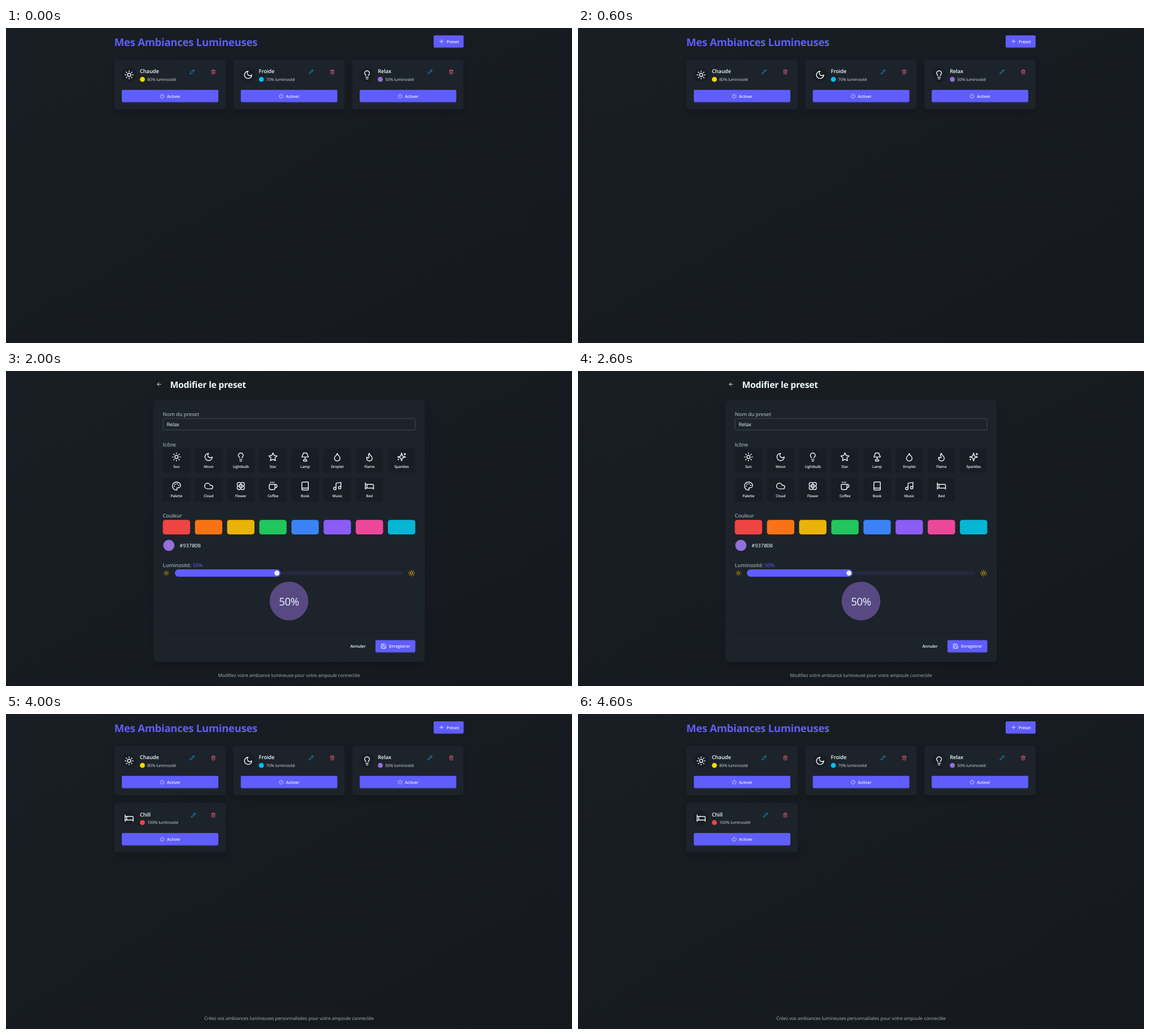
An HTML page for the animation above (5000 ms loop, 1002 by 559 pixels).

```html
<!DOCTYPE html>
<html lang="fr">
<head>
<meta charset="utf-8">
<title>Ambiances</title>
<style>
  html, body { margin: 0; width: 100%; height: 100%; overflow: hidden; }
  body { background: linear-gradient(to bottom right, #191e24, #15191e); }
  svg { display: block; width: 1002px; height: 559px; }
  text {
    font-family: "Open Sans", "Noto Sans", sans-serif;
    letter-spacing: -.015em;
    text-rendering: geometricPrecision;
    white-space: pre;
  }
  .mono { font-family: "Noto Sans Mono", "DejaVu Sans Mono", monospace; letter-spacing: 0; }
  .icon { fill: none; stroke-width: 2; stroke-linecap: round; stroke-linejoin: round; }
  .card { filter: drop-shadow(0 7px 5px rgb(0 0 0 / .14)); }
  .toast { filter: drop-shadow(0 2px 4px rgb(0 0 0 / .1)); }
</style>
</head>
<body>
<svg id="stage" viewBox="0 0 1002 559"></svg>
<script>
const INK = '#ecf9ff', PRIMARY = '#605dff', ON_PRIMARY = '#edf1fe';
const CARD = '#1d232a', TILE = '#191e24', MUTED = '#9aa3aa', AMBER = '#efb100';
const SWATCHES = ['#ef4444', '#f97316', '#eab308', '#22c55e', '#3b82f6', '#8b5cf6', '#ec4899', '#06b6d4'];

const ring = (x, y, r) => `M${x - r} ${y}a${r} ${r} 0 1 0 ${2 * r} 0a${r} ${r} 0 1 0 ${-2 * r} 0`;

// Outlines on a 24-unit grid
const ICONS = {
  Sun: ring(12, 12, 4) + 'M12 2v2M12 20v2M4.93 4.93l1.41 1.41M17.66 17.66l1.41 1.41M2 12h2M20 12h2M6.34 17.66l-1.41 1.41M19.07 4.93l-1.41 1.41',
  Moon: 'M12 3a6 6 0 0 0 9 9 9 9 0 1 1-9-9Z',
  Lightbulb: 'M15 14c.2-1 .7-1.7 1.5-2.5 1-.9 1.5-2.2 1.5-3.5A6 6 0 0 0 6 8c0 1 .2 2.2 1.5 3.5.7.7 1.3 1.5 1.5 2.5M9 18h6M10 22h4',
  Star: 'M12 2 15.1 8.3 22 9.3 17 14.1 18.2 21 12 17.8 5.8 21 7 14.1 2 9.3 8.9 8.3Z',
  Lamp: 'M8 2h8l4 10H4ZM12 12v6M8 22v-2c0-1.1.9-2 2-2h4a2 2 0 0 1 2 2v2Z',
  Droplet: 'M12 22a7 7 0 0 0 7-7c0-2-1-3.9-3-5.5s-3.5-4-4-6.5c-.5 2.5-2 4.9-4 6.5S5 13 5 15a7 7 0 0 0 7 7Z',
  Flame: 'M8.5 14.5A2.5 2.5 0 0 0 11 12c0-1.4-.5-2-1-3-1.1-2.1-.2-4 2-6 .5 2.5 2 4.9 4 6.5s3 3.5 3 5.5a7 7 0 1 1-14 0c0-1.2.4-2.3 1-3a2.5 2.5 0 0 0 2.5 2.5Z',
  Sparkles: 'M12 2.2 13.9 8.5a2 2 0 0 0 1.6 1.6L21.8 12 15.5 13.9a2 2 0 0 0-1.6 1.6L12 21.8 10.1 15.5a2 2 0 0 0-1.6-1.6L2.2 12 8.5 10.1a2 2 0 0 0 1.6-1.6ZM20 3v4M22 5h-4M4 17v2M5 18H3',
  Palette: ring(13.5, 6.5, .5) + ring(17.5, 10.5, .5) + ring(8.5, 7.5, .5) + ring(6.5, 12.5, .5) +
    'M12 2a10 10 0 0 0 0 20c.9 0 1.6-.7 1.6-1.7 0-.4-.2-.8-.4-1.1-.3-.3-.4-.7-.4-1.1a1.6 1.6 0 0 1 1.6-1.7h2c3.1 0 5.6-2.5 5.6-5.6C22 6 17.5 2 12 2Z',
  Cloud: 'M17.5 19H9a7 7 0 1 1 6.71-9h1.79a4.5 4.5 0 1 1 0 9Z',
  Flower: ring(12, 12, 3) + 'M12 16.5A4.5 4.5 0 1 1 7.5 12 4.5 4.5 0 1 1 12 7.5a4.5 4.5 0 1 1 4.5 4.5 4.5 4.5 0 1 1-4.5 4.5M12 7.5V9M7.5 12H9M16.5 12H15M12 16.5V15M8 8l1.9 1.9M14.1 9.9 16 8M8 16l1.9-1.9M14.1 14.1 16 16',
  Coffee: 'M6 2v2M10 2v2M14 2v2M16 8a1 1 0 0 1 1 1v8a4 4 0 0 1-4 4H7a4 4 0 0 1-4-4V9a1 1 0 0 1 1-1h14a4 4 0 1 1 0 8h-1',
  Book: 'M4 19.5v-15A2.5 2.5 0 0 1 6.5 2H19a1 1 0 0 1 1 1v18a1 1 0 0 1-1 1H6.5a1 1 0 0 1 0-5H20',
  Music: 'M9 18V5l12-2v13' + ring(6, 18, 3) + ring(18, 16, 3),
  Bed: 'M2 4v16M2 8h18a2 2 0 0 1 2 2v10M2 17h20M6 8v9'
};
const GLYPHS = {
  pencil: 'M21.2 6.8a1 1 0 0 0-4-4L3.8 16.2a2 2 0 0 0-.5.8L2 21.4a.5.5 0 0 0 .6.6L7 20.7a2 2 0 0 0 .8-.5ZM15 5l4 4',
  trash: 'M3 6h18M19 6v14c0 1-1 2-2 2H7c-1 0-2-1-2-2V6M8 6V4c0-1 1-2 2-2h4c1 0 2 1 2 2v2M10 11v6M14 11v6',
  power: 'M12 2v10M18.4 6.6a9 9 0 1 1-12.8 0',
  plus: 'M5 12h14M12 5v14',
  check: 'M20 6 9 17l-5-5',
  back: 'M12 19l-7-7 7-7M19 12H5',
  save: 'M15.2 3a2 2 0 0 1 1.4.6l3.8 3.8a2 2 0 0 1 .6 1.4V19a2 2 0 0 1-2 2H5a2 2 0 0 1-2-2V5a2 2 0 0 1 2-2ZM17 21v-7a1 1 0 0 0-1-1H8a1 1 0 0 0-1 1v7M7 3v4a1 1 0 0 0 1 1h7'
};

const rect = (x, y, w, h, r, fill, extra = '') =>
  `<rect x="${x}" y="${y}" width="${w}" height="${h}" rx="${r}" fill="${fill}" ${extra}/>`;
const disc = (x, y, r, fill, extra = '') => `<circle cx="${x}" cy="${y}" r="${r}" fill="${fill}" ${extra}/>`;
const text = (x, y, size, content, fill = INK, weight = 400, extra = '') =>
  `<text x="${x}" y="${y}" font-size="${size}" fill="${fill}" font-weight="${weight}" ${extra}>${content}</text>`;
const centered = (x, y, size, content, fill, weight) =>
  text(x, y, size, content, fill, weight, 'text-anchor="middle"');
const icon = (path, x, y, size, color = INK) =>
  `<path class="icon" d="${path}" stroke="${color}" transform="translate(${x} ${y}) scale(${size / 24}) translate(-12 -12)"/>`;

const button = (x, y, w, glyph, glyphX, size, labelX, label) =>
  rect(x + .5, y + 2, w - 1, 20.6, 2, PRIMARY, 'opacity=".4"') +
  rect(x, y, w, 21.4, 2.1, '#5956ee') +
  rect(x + .4, y + .4, w - .8, 20.6, 1.8, PRIMARY) +
  icon(GLYPHS[glyph], glyphX, y + 10.7, size, ON_PRIMARY) +
  text(labelX, y + 13.7, 7.3, label, ON_PRIMARY, 600);

const footer = content => centered(501, 542.6, 8.3, content, '#a8b1b7');

function presetCard(x, y, { name, iconName, color, level, pencilX = 137.5 }) {
  return rect(x, y, 196.7, 87.5, 4.3, CARD, 'class="card"') +
    disc(x + 26, y + 26.7, 12.9, TILE) +
    icon(ICONS[iconName], x + 26, y + 26.7, 17.2) +
    text(x + 45, y + 23.7, 9.4, name, INK, 600) +
    disc(x + 49.5, y + 34.7, 4.4, color) +
    text(x + 58, y + 37.4, 7.35, `${level}% luminosité`, '#cbd6dc') +
    icon(GLYPHS.pencil, x + pencilX, y + 21.3, 9.2, '#00bafe') +
    icon(GLYPHS.trash, x + 175, y + 21.3, 9.2, '#ff627d') +
    button(x + 13, y + 53.3, 171, 'power', x + 84.5, 9.2, x + 93, 'Activer');
}

const presets = [
  { name: 'Chaude', iconName: 'Sun', color: '#ffd700', level: 80 },
  { name: 'Froide', iconName: 'Moon', color: '#00bfff', level: 70 },
  { name: 'Relax', iconName: 'Lightbulb', color: '#9370db', level: 50 },
  { name: 'Chill', iconName: 'Bed', color: '#ef4444', level: 100, pencilX: 140 }
];

const home = count =>
  text(191.8, 31.5, 18.55, 'Mes Ambiances Lumineuses', PRIMARY, 700) +
  button(757, 13, 53.2, 'plus', 771, 10.7, 780, 'Preset') +
  presets.slice(0, count).map((preset, i) =>
    presetCard(192 + i % 3 * 210.6, 56.5 + Math.floor(i / 3) * 101.5, preset)).join('');

const toast = message =>
  rect(405.5, 13, 191, 28.7, 4.3, '#ecfdf3', 'stroke="#bffcd9" stroke-width=".5" class="toast"') +
  disc(417.8, 27.4, 4.3, '#008a2e') +
  `<path class="icon" d="M415.9 27.6l1.3 1.3 2.5-2.8" stroke="#ecfdf3" style="stroke-width:.9"/>` +
  text(427, 30, 6.9, message, '#008a2e', 500);

function editor({ title, name, selectedIcon, color, code, level, thumbX, glow, cancelX, action, note }) {
  const column = i => 277.6 + i % 8 * 56.93;

  const tiles = Object.entries(ICONS).map(([label, path], i) => {
    const x = column(i), y = 137.6 + Math.floor(i / 8) * 51.5;
    const active = label === selectedIcon;
    return rect(x, y, 48.4, 42.9, 2.1, active ? PRIMARY : TILE) +
      icon(path, x + 24.2, y + 15, 17.2) +
      centered(x + 24.2, y + 34.6, 6.4, label, INK, 600);
  }).join('');

  const swatches = SWATCHES.map((fill, i) => {
    const x = column(i), y = 264.2, active = fill === code;
    return (active ? rect(x - 3.1, y - 3.1, 54.6, 32, 6.5, PRIMARY) + rect(x - 1.1, y - 1.1, 50.6, 28, 5.2, '#fff') : '') +
      rect(x, y, 48.4, 25.8, 4.3, fill) +
      (active ? icon(GLYPHS.check, x + 24.2, y + 12.9, 10.7, '#fff') : '');
  }).join('');

  const label = (y, content) => text(277.6, y, 9.2, content, MUTED, 600);

  return icon(GLYPHS.back, 271, 23.6, 10.7) +
    text(290.5, 30.2, 15.7, title, INK, 700) +
    rect(260.6, 51.6, 480.8, 464.4, 7, CARD, 'class="card"') +
    label(80, 'Nom du preset') +
    rect(277.9, 84.2, 446.3, 20.6, 2, CARD, 'stroke="#4b535a" stroke-width=".8"') +
    text(284.4, 98, 9.2, name) +
    label(133.6, 'Icône') + tiles +
    label(260.4, 'Couleur') + swatches +
    disc(288.3, 309.4, 9.9, color) +
    text(307.6, 312.6, 8.9, code, INK, 400, 'class="mono"') +
    label(348.4, `Luminosité: <tspan fill="${PRIMARY}" font-weight="500">${level}%</tspan>`) +
    icon(ICONS.Sun, 284, 358.6, 10.7, AMBER) +
    icon(ICONS.Sun, 718, 358.6, 12.9, AMBER) +
    rect(299, 355.4, 404, 6.4, 3.2, '#242840') +
    rect(299, 352.1, thumbX + 6.4 - 299, 12.9, 6.4, PRIMARY) +
    disc(thumbX, 358.6, 4.3, ON_PRIMARY) +
    disc(501, 408.2, 34.3, color, `opacity="${glow}"`) +
    centered(501, 415.5, 18.6, level + '%') +
    rect(277.6, 464, 447, .6, 0, '#15191e') +
    text(cancelX, 491.3, 7.3, 'Annuler', INK, 600) +
    button(cancelX + 44.6, 477.6, 680 - cancelX, action.glyph, cancelX + 59, 10.7, cancelX + 68.6, action.label) +
    footer(note);
}

const creationNote = 'Créez vos ambiances lumineuses personnalisées pour votre ampoule connectée';
const scenes = [
  home(3),
  home(3) + toast('Preset activé: Relax'),
  editor({
    title: 'Modifier le preset', name: 'Relax', color: '#9370db', code: '#9370DB',
    level: 50, thumbX: 479.6, glow: .5, cancelX: 609.4,
    action: { glyph: 'save', label: 'Enregistrer' },
    note: 'Modifiez votre ambiance lumineuse pour votre ampoule connectée'
  }),
  editor({
    title: 'Créer un nouveau preset', name: 'Chill', selectedIcon: 'Bed', color: '#ef4444', code: '#ef4444',
    level: 100, thumbX: 696.6, glow: 1, cancelX: 597,
    action: { glyph: 'plus', label: 'Créer le preset' },
    note: creationNote
  }),
  home(4) + footer(creationNote)
];

const stage = document.getElementById('stage');
const SCENE_MS = 1000;
let shown = -1;

function render() {
  const index = Math.floor(performance.now() / SCENE_MS) % scenes.length;
  if (index !== shown) stage.innerHTML = scenes[shown = index];
  requestAnimationFrame(render);
}
render();
</script>
</body>
</html>
```
